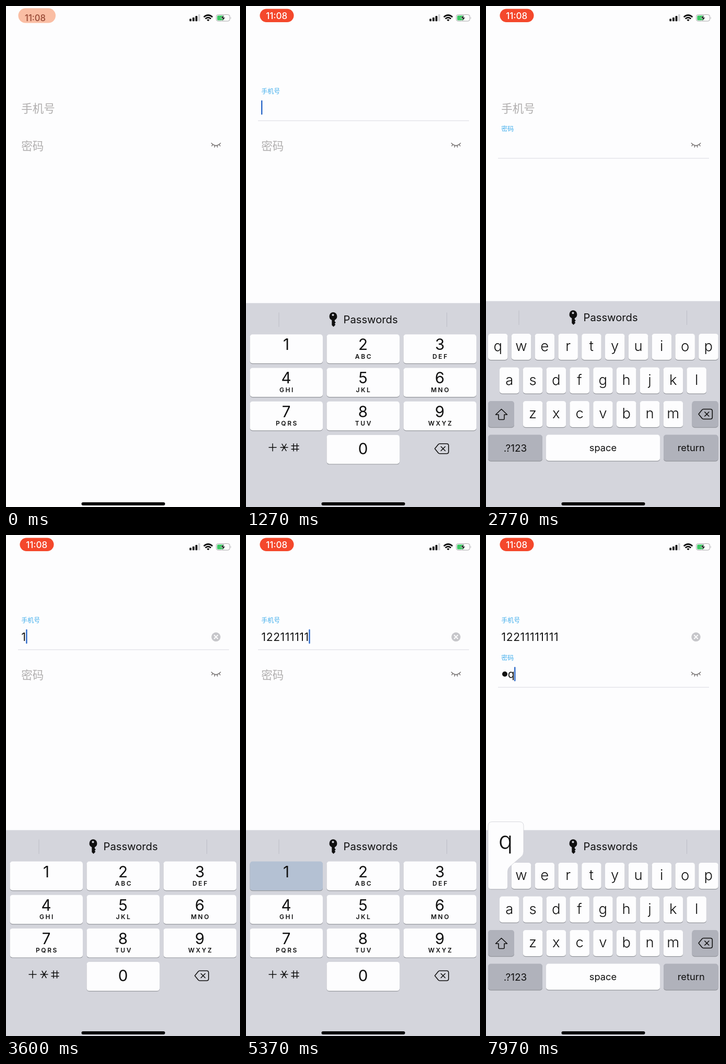
An HTML page that plays this animation: 448 by 960 pixels, repeating every 8 s.

```html
<!DOCTYPE html>
<html lang="zh">
<head>
<meta charset="utf-8">
<title>Login form</title>
<style>
  html, body { margin: 0; width: 100%; height: 100%; overflow: hidden; background: #fdfdfe; }
  svg { display: block; width: 100%; height: 100%; }
  text { font-family: Inter, Roboto, sans-serif; fill: #101010; white-space: pre; }
  .cjk { font-family: "Noto Sans CJK SC", "Noto Sans CJK", sans-serif; font-weight: 300; }
  .mid { text-anchor: middle; }
  .line { fill: none; stroke: #101010; stroke-linecap: round; stroke-linejoin: round; }
</style>
</head>
<body>
<svg id="stage" viewBox="0 0 448 960">
  <rect width="448" height="960" fill="#fdfdfe"/>

  <rect id="pill"/>
  <text id="clock" class="mid" font-weight="500">11:08</text>
  <g fill="#0c0c0c">
    <rect x="351.3" y="24.5" width="3.8" height="4.7" rx="1"/>
    <rect x="357" y="22" width="3.8" height="7.2" rx="1"/>
    <rect x="362.6" y="19" width="3.8" height="10.2" rx="1"/>
    <rect x="368" y="15.7" width="3.6" height="13.5" rx="1" fill="#d2d2d4"/>
  </g>
  <g fill="none" stroke="#0c0c0c" stroke-width="2.7">
    <path d="M378.7 21.3Q387 13.7 395.3 21.3"/>
    <path d="M381.7 24.6Q387 19.8 392.3 24.6"/>
    <path d="M387 29.3L384.3 26.6Q387 24.6 389.7 26.6Z" fill="#0c0c0c" stroke="none"/>
  </g>
  <rect x="402.5" y="16.5" width="26" height="12.5" rx="3.8" fill="#fdfdfe" stroke="#a6a6a8"/>
  <rect x="404.2" y="18.2" width="13" height="9.2" rx="2.2" fill="#3cc864"/>
  <path d="M430 21v4q1.8-2 0-4" fill="#a6a6a8"/>
  <path d="M417.5 16.5L411 23.6H415L413 29.5L420 22H415.8Z" fill="#0c0c0c" stroke="#fdfdfe" stroke-width=".7"/>

  <text id="phoneLabel" class="cjk" x="29.3">手机号</text>
  <text id="passLabel" class="cjk" x="29.3">密码</text>
  <rect id="phoneLine" x="23" y="219.3" width="404" height="1.1" fill="#dcdce4"/>
  <rect id="passLine" x="23" y="291.3" width="404" height="1.1" fill="#dcdce4"/>
  <text id="phone" x="29.5" y="202.5" font-size="21" letter-spacing=".65"></text>
  <circle id="bullet" cx="36" cy="266.5" r="5" fill="#101010"/>
  <text id="pass" y="274" font-size="21"></text>
  <rect id="caret" width="2.4" height="27.5" rx="1" fill="#2b68c8"/>
  <g id="clear">
    <circle cx="402" cy="195.3" r="8.7" fill="#c6c6ca"/>
    <path d="M398.8 192.1l6.4 6.4m0-6.400l-6.4 6.4" stroke="#fdfdfe" stroke-width="2" stroke-linecap="round"/>
  </g>
  <path d="M393.3 262.8Q402 272 410.7 262.8M396 265.4l-2 2.7M400 267.2l-.8 3.3M404 267.2l.8 3.3M408 265.4l2 2.7"
    class="line" style="stroke:#747070;stroke-width:1.5"/>

  <g id="board">
    <rect y="565.5" width="448" height="800" fill="#d4d5dc"/>
    <path d="M63 583.5v27.5M384.5 583.5v27.5" stroke="#bcbdc6"/>
    <path fill-rule="evenodd" fill="#101010" d="M166.5 583a8 8 0 0 1 3.3 15.2v2.3l2 2.2-2 2.2 1.5 2-3.8 4.1-3.2-3.3v-9.5A8 8 0 0 1 166.5 583zm0 3.3a2 2 0 1 0 .01 0z"/>
    <text x="186.5" y="604.3" font-size="20.2">Passwords</text>
    <g id="pad"></g>
    <g id="letters"></g>
  </g>
  <g id="popup">
    <path d="M12 549.5H64Q72 549.5 72 557.5V607Q72 613 67 617L46 635Q41.5 639 41.5 645V673.5Q41.5 678.5 36.5 678.5H9Q4 678.5 4 673.5V557.5Q4 549.5 12 549.5Z"
      fill="#fdfdfe" stroke="#c8c9d0" stroke-width=".7"/>
    <text class="mid" x="37.5" y="601" font-size="45" font-weight="300">q</text>
  </g>
  <rect x="144.5" y="951" width="160" height="6" rx="3" fill="#000"/>
</svg>
<script>
const $ = id => document.getElementById(id);
const LOOP = 8000;
const PHONE = '12211111111';
const DIGITS = [3480, 3800, 4110, 4330, 4550, 4740, 4930, 5120, 5310, 5570, 5815];
const LETTERS = [7620, 7900];
const FOCUS = [820, 2080, 3220, 7000];
const HOLD = 120;
const WHITE = '#fdfdfe', GRAY = '#b0b2bb', PRESSED = '#b4c1d3';

function add(parent, tag, attrs, text) {
  const el = document.createElementNS('http://www.w3.org/2000/svg', tag);
  set(el, attrs);
  if (text) el.textContent = text;
  parent.appendChild(el);
  return el;
}
function set(el, attrs) {
  for (const k in attrs) el.setAttribute(k, attrs[k]);
}
function key(parent, x, y, w, h, fill = WHITE) {
  add(parent, 'rect', { x, y: y + 1.2, width: w, height: h, rx: 5, fill: '#94969c' });
  return add(parent, 'rect', { x, y, width: w, height: h, rx: 5, fill });
}
function label(parent, str, x, y, size, attrs) {
  add(parent, 'text', { class: 'mid', x, y, 'font-size': size, ...attrs }, str);
}
function icon(parent, d, x, y, width = 1.6) {
  add(parent, 'path', { class: 'line', d, transform: `translate(${x} ${y})`, 'stroke-width': width });
}
const BACKSPACE = 'M-13 0L-6.5-8Q-5.3-9.5-3.5-9.5H9.5Q13.3-9.5 13.3-6V6Q13.3 9.5 9.5 9.5H-3.5Q-5.3 9.5-6.5 8ZM-1.2-4L6.8 4M6.8-4L-1.2 4';

function buildPad() {
  const pad = $('pad'), keys = {};
  const subs = ['', 'ABC', 'DEF', 'GHI', 'JKL', 'MNO', 'PQRS', 'TUV', 'WXYZ'];
  const make = (n, col, row) => {
    const x = 7.5 + col * 147, y = 625.5 + row * 64.2;
    keys[n] = key(pad, x, y, 139.5, 55.5);
    label(pad, n, x + 69.5, y + (row < 3 ? 30 : 37.3), 29.5);
    if (subs[n - 1]) {
      label(pad, subs[n - 1], x + 71, y + 46.5, 12, { 'font-weight': 600, 'letter-spacing': 2.6 });
    }
  };
  for (let n = 1; n < 10; n++) make(String(n), (n - 1) % 3, Math.floor((n - 1) / 3));
  make('0', 1, 3);
  icon(pad, 'M-7 0H7M0-7V7', 51, 842, 1.5);
  icon(pad, 'M-7 0H7M-4-6.5L4 6.5M4-6.5L-4 6.5', 73, 842, 1.5);
  icon(pad, 'M-7-3H7M-7 3.5H7M-3-7V7M3.5-7V7', 94, 842, 1.5);
  icon(pad, BACKSPACE, 374.5, 844.5);
  return keys;
}

function buildLetters() {
  const g = $('letters');
  const rows = [['qwertyuiop', 4], ['asdfghjkl', 26], ['zxcvbnm', 70.8]];
  rows.forEach(([chars, left], r) => [...chars].forEach((c, i) => {
    const x = left + i * 44.8, y = 628 + r * 64.5;
    key(g, x, y, 37.5, 50);
    label(g, c, x + 18.7, y + 33, 27.5, { 'font-weight': 300 });
  }));
  key(g, 4, 757, 50, 50, GRAY);
  key(g, 394.5, 757, 50, 50, GRAY);
  icon(g, 'M0-10L11 .5H5.5V8.5Q5.5 10 4 10H-4Q-5.5 10-5.5 8.5V.5H-11Z', 29.5, 782.5);
  icon(g, BACKSPACE, 420, 782);
  key(g, 4, 821.5, 104, 50, GRAY);
  key(g, 115, 821.5, 218, 50);
  key(g, 340, 821.5, 104.5, 50, GRAY);
  label(g, '.?123', 56, 854, 19);
  label(g, 'space', 224, 852.8, 18.3);
  label(g, 'return', 392.7, 852.8, 18.3);
}

const clamp = v => Math.max(0, Math.min(1, v));
const mix = (a, b, k) => a + (b - a) * k;
const rgb = (a, b, k) => `rgb(${a.map((v, i) => Math.round(mix(v, b[i], k)))})`;
function ramp(t, start, len = 200) {
  const k = clamp((t - start) / len);
  return k * k * (3 - 2 * k);
}
const show = (el, on) => { el.style.display = on ? '' : 'none'; };

function floatLabel(el, k, y) {
  set(el, { y: mix(y, y - 36.2, k), 'font-size': mix(21.5, 12, k) });
  el.style.fill = rgb([176, 174, 174], [66, 174, 236], k);
}

function drawClock(t) {
  const k = ramp(t, 0, 450);
  set($('pill'), {
    x: mix(23.5, 26.5, k), y: mix(4.3, 5.5, k),
    width: mix(71.5, 65, k), height: mix(28.2, 25.5, k), rx: mix(14, 12.7, k),
    fill: rgb([250, 190, 164], [244, 72, 44], k)
  });
  set($('clock'), { x: mix(56, 58.7, k), y: mix(28.8, 24.5, k), 'font-size': mix(16.6, 17, k) });
  $('clock').style.fill = rgb([150, 72, 52], [255, 255, 255], k);
}

function blink(p) {
  if (p < 0.5) return 1;
  return p < 0.65 ? (0.65 - p) / 0.15 : clamp((p - 0.9) / 0.1);
}

const keys = buildPad();
buildLetters();

function draw(t) {
  drawClock(t);

  const [a, b, c, d] = FOCUS.map(s => ramp(t, s));
  floatLabel($('phoneLabel'), a - b + c, 203.7);
  floatLabel($('passLabel'), b - c + d, 275.7);
  $('phoneLine').style.opacity = a - b + c - d;
  $('passLine').style.opacity = b - c + d;

  const focus = FOCUS.filter(s => s <= t).length;
  const onPass = focus > 0 && focus % 2 === 0;
  const typed = DIGITS.filter(s => s <= t).length;
  const chars = LETTERS.filter(s => s <= t).length;
  $('phone').textContent = PHONE.slice(0, typed);
  $('pass').textContent = chars ? 'q' : '';
  $('pass').setAttribute('x', chars > 1 ? 41.7 : 29.5);
  show($('bullet'), chars > 1);
  show($('clear'), typed > 0);

  const last = Math.max(0, ...[...FOCUS, ...DIGITS, ...LETTERS].filter(s => s <= t));
  const field = $(onPass ? 'pass' : 'phone');
  const end = field.textContent ? +field.getAttribute('x') + field.getComputedTextLength() : 29.5;
  set($('caret'), { x: end - 0.5, y: onPass ? 252.8 : 180.8 });
  $('caret').style.opacity = focus ? blink((t - last) / 1000 % 1) : 0;

  // Critically damped slide of the keyboard
  const s = Math.max(0, t - 905) * 0.01826;
  $('board').setAttribute('transform', `translate(0 ${395 * (1 + s) * Math.exp(-s)})`);
  show($('pad'), !onPass);
  show($('letters'), onPass);

  const held = times => times.findIndex(s => t >= s && t < s + HOLD);
  const down = PHONE[held(DIGITS)];
  for (const n in keys) keys[n].setAttribute('fill', n === down ? PRESSED : WHITE);
  show($('popup'), held(LETTERS) >= 0);
}

const start = performance.now();
function tick() {
  draw((performance.now() - start) % LOOP);
  requestAnimationFrame(tick);
}
tick();
</script>
</body>
</html>
```
